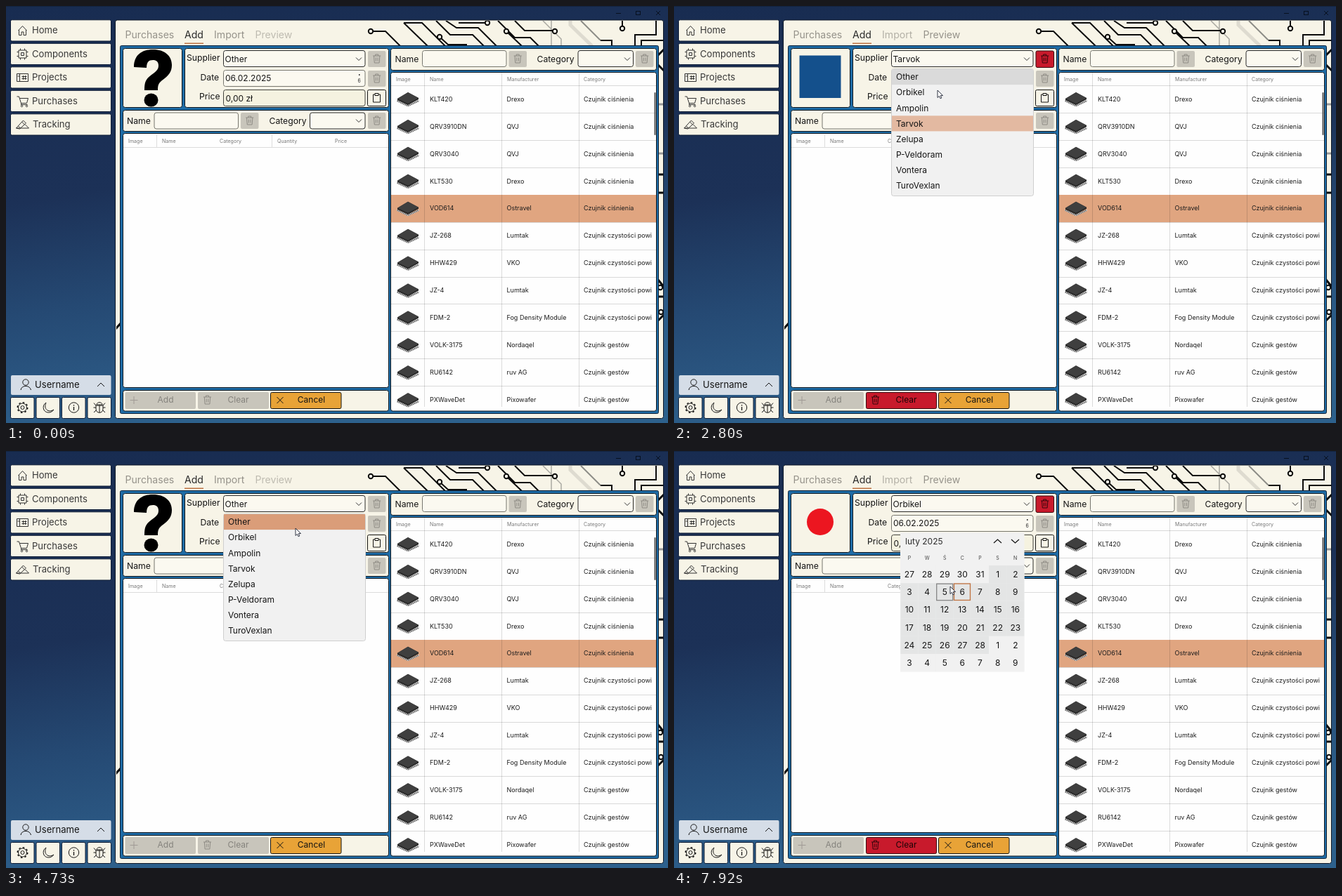
Write an HTML page that moves like this. It is 942 px wide and 594 px high and loops after 8000 ms.

```html
<!DOCTYPE html>
<html lang="en">
<head>
<meta charset="utf-8">
<title>Purchase form</title>
<style>
html, body { margin: 0; width: 100%; height: 100%; overflow: hidden; background: #1b2f54; }
svg { display: block; position: absolute; left: 0; top: 0; font-family: Inter, "Open Sans", sans-serif; }
text { white-space: pre; }
</style>
</head>
<body>
<svg id="stage" width="942" height="594" viewBox="0 0 942 594"></svg>
<script>
const LOOP = 8000;
const CREAM = '#f7f4e7', INK = '#141414', GREY = '#c8c5bb', RED = '#c81a2c', BLUE = '#1e6ba5', SOFT = '#77776f';
const suppliers = ['Other', 'Orbikel', 'Ampolin', 'Tarvok', 'Zelupa', 'P-Veldoram', 'Vontera', 'TuroVexlan'];
const parts = [
  ['KLT420', 'Drexo', 0], ['QRV3910DN', 'QVJ', 0], ['QRV3040', 'QVJ', 0], ['KLT530', 'Drexo', 0],
  ['VOD614', 'Ostravel', 0], ['JZ-268', 'Lumtak', 1], ['HHW429', 'VKO', 1], ['JZ-4', 'Lumtak', 1],
  ['FDM-2', 'Fog Density Module', 1], ['VOLK-3175', 'Nordaqel', 2], ['RU6142', 'ruv AG', 2], ['PXWaveDet', 'Pixowafer', 2]
];
const kinds = ['Czujnik ciśnienia', 'Czujnik czystości powi', 'Czujnik gestów'];

// Drawing helpers; boxes are given by their edges, text by its middle line.
const box = (l, t, r, b, fill, stroke = 'none', rx = 0, more = '') =>
  `<rect x="${l}" y="${t}" width="${r - l}" height="${b - t}" rx="${rx}" fill="${fill}" stroke="${stroke}" ${more}/>`;
const text = (x, y, s, size = 12, fill = INK, more = '') =>
  `<text x="${x}" y="${(y + size * 0.36).toFixed(2)}" font-size="${size}" fill="${fill}" ${more}>${s}</text>`;
const mid = (x, y, s, size, fill, more = '') => text(x, y, s, size, fill, 'text-anchor="middle" ' + more);
const line = (d, stroke = INK, w = 1, more = '') =>
  `<path d="${d}" fill="none" stroke="${stroke}" stroke-width="${w}" ${more}/>`;
const dot = (x, y, r, fill, stroke = 'none', w = 1) =>
  `<circle cx="${x}" cy="${y}" r="${r}" fill="${fill}" stroke="${stroke}" stroke-width="${w}"/>`;
const at = (x, y, s) => `<g transform="translate(${x} ${y})">${s}</g>`;
const group = (id, s, shown = false) => `<g id="${id}"${shown ? '' : ' display="none"'}>${s}</g>`;

const bin = (x, y, c) => at(x, y, line('M-5.5-4H5.5M-2-4V-6H2V-4M-4.2-4L-3.4 6H3.4L4.2-4M-1.3-1.5V3.5M1.3-1.5V3.5', c));
const down = (x, y) => line(`M${x - 4} ${y - 2}l4 4l4-4`, '#333');
const field = (l, t, r, edge = '#2b2b2b', fill = '#fbf9f0') => box(l + .5, t + .5, r - .5, t + 23.5, fill, edge, 3);
const binButton = (l, t) => box(l, t, l + 25.5, t + 23, GREY, 'none', 2) + bin(l + 12.7, t + 11, '#8e8b84');
const panel = (l, t, r, b, fill = CREAM) => box(l + .5, t + .5, r - .5, b - .5, fill, '#101820', 3);

function backdrop() {
  return `<defs>
    <linearGradient id="sky" x1="0" y1="0" x2=".25" y2="1">
      <stop offset="0" stop-color="#182c51"/><stop offset=".45" stop-color="#1c3157"/>
      <stop offset=".7" stop-color="#254973"/><stop offset=".85" stop-color="#2a5580"/><stop offset="1" stop-color="#2d618d"/>
    </linearGradient>
    <clipPath id="sheet"><rect x="157" y="21" width="778" height="566"/></clipPath>
    <g id="chip">
      <path d="M-16 1V3L0 10.500L16 3V1L0 8Z" fill="#c4c4c4"/>
      <path d="M-15 2L0 9L15 2" fill="none" stroke="#555" stroke-width="2.6" stroke-dasharray="1 1.4"/>
      <path d="M-15-1L0-10L15-2V0L0 8L-15 1Z" fill="#262626"/>
      <path d="M-15-1L0-10L15-2L0 6Z" fill="#3f3f3f"/>
    </g></defs>`
    + box(0, 0, 942, 594, 'url(#sky)') + box(0, 0, 942, 1, '#13233f')
    + line('M868 10.500H875', '#07101f') + box(896.5, 7.5, 902.500, 12.5, 'none', '#07101f') + line('M925 7l6 6m0-6l-6 6', '#07101f');
}

function sidebar() {
  const icons = [
    'M-6 0L0-6.500L6 0M-5-1V6.500H-1.500V2H1.500V6.500H5V-1',
    'M-5.500-5.500H5.500V5.500H-5.500ZM-2-2H2V2H-2ZM-3-5.500V-8M3-5.500V-8M-3 5.500V8M3 5.500V8M-5.500-3H-8M-5.500 3H-8M5.500-3H8M5.500 3H8',
    'M-8-5.500H8V5.500H-8ZM-4-5.500V5.500M-1-1.500H6M-1 1.500H6M1-3V3M4-3V3M-7-2H-4',
    'M-8-6.500H-5L-2 3H6L8-4H-4M-2 3V5H7',
    'M-9 5L1-6L5-2L-4 6ZM-9 5H9L4 0M-1-4L3 0M-6 2L-3 5'
  ];
  let s = ['Home', 'Components', 'Projects', 'Purchases', 'Tracking'].map((name, i) => {
    const y = 20 + i * 33.5;
    return box(6.5, y - .2, 149.5, y + 30, CREAM, '#0c1a33', 2)
      + at(23.500, y + 15, line(icons[i], '#333') + (i == 3 ? dot(-1, 7, 1.2, 'none', '#333') + dot(6, 7, 1.2, 'none', '#333') : ''))
      + text(i == 4 ? 38 : 37, y + 14.5, name, 13.1, '#383838');
  }).join('');
  s += box(7, 526, 149.5, 554, '#d5dde7', 'none', 2) + dot(28, 536, 4.2, 'none', '#222')
    + line('M21 547C22 539.500 34 539.500 35.500 547') + text(41, 539.5, 'Username', 13.1) + line('M130 542l5-5l5 5');
  for (const l of [7, 43.5, 80, 116.500]) s += box(l - .5, 557.5, l + 33, 587.500, CREAM, '#0c1a33', 2);
  return s + dot(23.5, 572, 2.500, 'none', INK) + dot(23.5, 572, 6, 'none', INK)
    + `<circle cx="23.5" cy="572" r="7.2" fill="none" stroke="${INK}" stroke-width="1.6" stroke-dasharray="2.6 3.05"/>`
    + line('M57 565C53 574 60 580 68 575C64 581 55 580 53.500 574C52.500 570 54 567 57 565Z')
    + dot(96.5, 572, 7.2, 'none', INK) + line('M96.500 571V576M96.500 568V569.500', INK, 1.3)
    + line('M129 568C129 563.500 137 563.500 137 568ZM128 569H138V574C138 581 128 581 128 574ZM133 569V579M128 572H124.500M138 572H141.500M128 576L125 579M138 576L141 579M128 569L125 565.500M138 569L141 565.500');
}

function circuit() {
  const black = [
    'M519 36H540L562 58', 'M566 24H592L626 58', 'M566 24L600 57', 'M617 44L629 55H656',
    'M612 21L632 41H664L680 57', 'M626 21L641 31H672L698 57', 'M644 24H685', 'M712 36L734 57', 'M700 21L724 45H746L758 57',
    'M724 21L738 35H781', 'M877 32V21', 'M862 57V49H846', 'M895 57V41H925V21', 'M904 57V49H936'];
  const edge = ['M928 70L936 62M928 84L936 92', 'M928 240H936M928 266H936',
    'M928 390L936 400M928 414H936M928 448L936 440', 'M156 460L164 451'];
  const rings = [[519, 36], [617, 44], [685, 24], [712, 36], [781, 36], [877, 32], [931, 401], [932, 436]];
  return '<g clip-path="url(#sheet)">'
    + line('M776 21V57M790 57V47L764 21', '#aaa9a2', 1.5)
    + line('M803 21V27L834 57', '#dedbd0', 5) + line('M818 21L846 49', '#8d8c87', 2) + line('M928 140H936M928 210H936', '#999', 3)
    + line(black.join(''), '#0b0b0b', 2) + line(edge.join(''), '#0b0b0b', 3)
    + rings.map(([x, y]) => dot(x, y, 3.2, CREAM, '#0b0b0b', 2)).join('') + '</g>';
}

function formPart() {
  let s = box(162.5, 56.500, 928.500, 580.500, BLUE, '#0f2238', 2)
    + panel(166, 60, 251, 145) + panel(254, 60, 545, 145) + panel(166, 148, 545, 179)
    + panel(166, 181, 545, 544, '#fefefe') + panel(166, 547, 545, 577.500);
  s += text(257, 74, 'Supplier', 12.2) + text(276.5, 101.500, 'Date', 12.2) + text(275, 129, 'Price', 12.2)
    + field(309, 63, 511.5) + down(502, 75.500) + binButton(515, 64)
    + field(309, 91, 511.5, SOFT) + group('focus', box(309.5, 91.5, 511, 115, '#fff', '#c96f3a', 3, 'stroke-width="1.6"') + line('M376.500 96.500V109.500'))
    + text(312, 103, '06.02.2025') + box(502, 97, 503.5, 99, '#333') + mid(502.7, 106, '6', 7, '#333') + binButton(515, 92)
    + field(309, 119, 511.5, '#44443e', '#f5f2e0') + text(312.500, 132, '0,00 zł')
    + box(514.5, 119.5, 540.5, 142.500, CREAM, INK, 2)
    + line('M525 126H522.500V137H532.500V126H530M525 124.500H530V127.500H525Z');
  s += text(172, 163.5, 'Name', 12.2) + field(210.500, 151.5, 331, SOFT) + binButton(334, 152) + text(374.500, 163.5, 'Category', 12.2)
    + field(432, 151.5, 511.5) + down(502, 163.500) + binButton(515, 152);
  [['Image', 174], ['Name', 222], ['Category', 304], ['Quantity', 386], ['Price', 468]]
    .forEach(([name, x]) => s += text(x, 192, name, 7.1, '#777'));
  s += line('M167 201.500H544M214.500 183V201M378.500 183V201', '#dcdcdc');
  s += box(169.5, 550, 270, 574, GREY, 'none', 2) + line('M176.500 561.500H187.500M182 556V567', '#a09a95') + mid(227, 561, 'Add', 12, '#85837d')
    + box(273, 550, 374, 574, GREY, 'none', 2) + bin(286.500, 561, '#8e8b84') + mid(330.5, 561, 'Clear', 12, '#85837d')
    + box(376.5, 550.5, 477, 573.500, '#e8a337', INK, 2) + line('M385.500 557l9 9m0-9l-9 9') + mid(434.500, 561, 'Cancel', 12, INK);
  return s;
}

function stock() {
  let s = panel(547, 60, 926, 92) + text(553.5, 75.500, 'Name', 12.2) + field(592, 63, 712.5, SOFT) + binButton(715.500, 64)
    + text(755.500, 75.5, 'Category', 12.2) + field(813.5, 63, 893) + down(884, 75.500) + binButton(896, 64)
    + panel(547, 94, 926, 577.500, '#fefefe');
  [['Image', 555], ['Name', 603], ['Manufacturer', 713], ['Category', 822]]
    .forEach(([name, x]) => s += text(x, 104, name, 7.1, '#777'));
  parts.forEach(([name, maker, kind], i) => {
    const y = 132.500 + i * 38.93;
    s += line(`M548 ${Math.round(y - 19.5) + .5}H925`, '#d9d9d9')
      + (i == 4 ? box(548, 269, 925, 308, '#e0a580') : '')
      + `<use href="#chip" x="572" y="${y + .500}"/>`
      + text(603, y, name, 9, '#1c1c1c') + text(712.5, y, maker, 9, '#1c1c1c') + text(822, y, kinds[kind], 9, '#1c1c1c');
  });
  return s + line('M595.500 95V571M705.500 95V571M815.500 95V571', '#000', 1, 'opacity=".14"') + box(922.5, 123, 924.5, 184, '#555', 'none', 1);
}

function badges() {
  const ask = `<path d="M182 87C182 70 193 62 209 62C226 62 236 71 236 84C236 94 231 99 224 104.500C217 109.500 216 112 216 120H197C197 108 199 104 207 98C213 93.500 217 91 217 85C217 79.500 214 77 209 77C203 77 200 80 200 88Z"/><ellipse cx="206.500" cy="134" rx="10" ry="9.500"/>`;
  return group('badge0', ask) + group('badge1', dot(208, 101, 19, '#ec1620'))
    + group('badge3', box(178.5, 70.5, 237.500, 131, '#14508c')) + group('badge6', dot(209, 102, 18, '#f95c0c'));
}

function popups() {
  const drop = box(309.5, 89.5, 511.5, 270.500, '#f1f1f1', '#cfcfcf', 3)
    + '<rect id="picked" x="310" width="201" height="22.1"/><rect id="hovered" x="310" width="201" height="22.1" fill="#dadada"/>'
    + suppliers.map((s, i) => text(316, 101 + i * 22.1, s)).join('');
  let cal = box(322, 116, 498.500, 314.500, '#f1f1f1') + text(329, 128.500, 'luty 2025', 12, '#2b2b2b')
    + line('M455 131l5.500-5l5.500 5M480 126l5.500 5l5.500-5', INK, 1.2);
  [...'PWŚCPSN'].forEach((c, i) => cal += mid(335 + i * 25.1, 152, c, 7, '#444'));
  for (let i = 0; i < 42; i++) {
    const x = 322.3 + i % 7 * 25.15, y = 163 + (i / 7 | 0) * 25.2, off = i - 5;
    const inside = off >= 0 && off < 28;
    const day = off < 0 ? 32 + off : inside ? off + 1 : off - 27;
    cal += box(x, y, x + 25.2, y + 25.2, inside ? '#e4e5e5' : '#f1f1f1') + mid(x + 12.6, y + 12.6, day, 12, INK);
  }
  cal += box(398.5, 189, 421.500, 212.500, 'none', '#c0723f', 0, 'stroke-width="1.3"')
    + '<rect id="day" width="23" height="23.500" fill="none" stroke="#858585" stroke-width="1.3"/>';
  return group('drop', drop) + group('calendar', cal);
}

const live = box(515, 64, 540.5, 87.500, RED, '#3a0a10', 2) + bin(527.700, 75, '#33060b')
  + box(273.5, 550.5, 373.500, 573.500, RED, '#3a0a10', 2) + bin(286.500, 561, '#33060b') + mid(330.5, 561, 'Clear', 12, '#1c0507');

document.getElementById('stage').innerHTML = backdrop() + sidebar()
  + box(155.5, 20, 935.5, 587.500, CREAM, '#0c1626', 3) + circuit()
  + text(169.5, 41, 'Purchases', 14.1, '#95928a') + text(254, 41, 'Add', 14.1, '#2a2a2a') + box(254, 52.500, 281, 54, '#c07443')
  + `<g id="import">${text(296, 41, 'Import', 14.1, 'inherit')}</g><g id="preview">${text(354.500, 41, 'Preview', 14.1, 'inherit')}</g>`
  + formPart() + stock() + badges() + group('live', live, true)
  + text(311.500, 75.5, 'Other', 12, INK, 'id="supplier"') + popups()
  + group('arrow', '<path d="M0 0V10.500L2.500 8.300L4 11.800L5.800 11L4.300 7.600H7.500Z" fill="#fff" stroke="#1c2233" stroke-width=".9"/>')
  + group('beam', line('M-2.500-5.500H-.500L0-5L.500-5.500H2.500M0-5V5M-2.500 5.500H-.500L0 5L.500 5.500H2.500', '#111'));

// Bursts of movement: start, end, number of steps.
const bursts = [[290, 1090, 9], [1190, 1890, 8], [2190, 2500, 4], [2700, 3100, 5], [3310, 4110, 9],
  [4210, 4820, 7], [5020, 5720, 8], [5920, 6620, 8], [6730, 7220, 6], [7420, 7920, 6]];
// Pointer path: time, x, y.
const path = [[290, 464, 584], [490, 330, 440], [690, 260, 250], [890, 350, 115], [1090, 420, 76], [1290, 415, 78],
  [1590, 385, 125], [1790, 377, 167], [1890, 377, 171], [2190, 377, 171], [2500, 385, 78], [2700, 378, 100], [2800, 375, 120],
  [3000, 373, 226], [3310, 372, 233], [3510, 457, 97], [3710, 524, 77], [4010, 526, 76], [4210, 500, 75], [4410, 455, 78],
  [4610, 425, 101], [4700, 412, 110], [4740, 412, 110], [4820, 402, 121], [5020, 400, 123], [5720, 360, 105],
  [6220, 335, 108], [6330, 335, 108], [6620, 493, 103], [6730, 502, 103], [7220, 502, 104], [7420, 496, 112], [7820, 393, 192], [7920, 393, 193]];
const picks = [[0, 0], [2190, 3], [3310, 6], [4010, 0], [5020, 1]];
const openings = [[1290, 2190], [2700, 3310], [4410, 5020]];

const $ = id => document.getElementById(id);
const show = (id, on) => $(id).setAttribute('display', on ? 'inline' : 'none');
const set = (id, attrs) => { for (const k in attrs) $(id).setAttribute(k, attrs[k]); };

function snap(t) {
  const b = bursts.filter(b => b[0] <= t).pop();
  if (!b) return 0;
  const d = (b[1] - b[0]) / (b[2] - 1);
  return Math.min(b[1], b[0] + Math.floor((t - b[0]) / d + 1e-6) * d);
}

function pointer(t) {
  const i = path.findIndex(p => p[0] > t);
  if (i < 0) return path[path.length - 1].slice(1);
  if (i == 0) return path[0].slice(1);
  const [t0, x0, y0] = path[i - 1], [t1, x1, y1] = path[i], k = (t - t0) / (t1 - t0);
  return [x0 + (x1 - x0) * k, y0 + (y1 - y0) * k];
}

function render(now) {
  const t = snap(now), [x, y] = pointer(t), [hx, hy] = pointer(t - 100);
  const pick = picks.filter(p => p[0] <= t).pop(), chosen = pick[1];
  const open = openings.some(([a, b]) => t >= a && t < b), calendar = t >= 6830;

  $('supplier').textContent = suppliers[chosen];
  [0, 1, 3, 6].forEach(i => show('badge' + i, i == chosen));
  const fade = Math.min(1, (t - pick[0] + 100) / 300);
  const wasOn = pick[0] == 3310;
  set('live', { opacity: chosen ? (wasOn ? 1 : fade) : pick[0] ? 1 - fade : 0 });
  set('import', { fill: chosen ? '#b3b0a6' : '#95928a' });
  set('preview', { fill: chosen ? '#95928a' : '#bebbb0' });

  show('drop', open);
  const row = Math.floor((hy - 90) / 22.1);
  const hover = row >= 0 && row < 8 && hx > 309 && hx < 511 ? row : -1;
  set('picked', { y: 90 + chosen * 22.1, fill: hover == chosen ? '#da9d79' : '#e3b9a1' });
  show('hovered', open && hover >= 0 && hover != chosen);
  set('hovered', { y: 90 + hover * 22.1 });

  show('calendar', calendar);
  const col = Math.floor((hx - 322.3) / 25.15), week = Math.floor((hy - 163) / 25.2);
  show('day', calendar && week >= 0 && col >= 0 && col < 7);
  set('day', { x: 323.4 + col * 25.15, y: 164 + week * 25.2 });
  show('focus', t >= 6220 && t < 6730);

  const typing = !open && !calendar && x > 309 && x < 496 && y > 91 && y < 115;
  show('arrow', t > 0 && !typing);
  show('beam', t > 0 && typing);
  set(typing ? 'beam' : 'arrow', { transform: `translate(${x.toFixed(1)} ${y.toFixed(1)})` });
}

const start = performance.now();
function tick() {
  render((performance.now() - start) % LOOP);
  requestAnimationFrame(tick);
}
tick();
</script>
</body>
</html>
```
